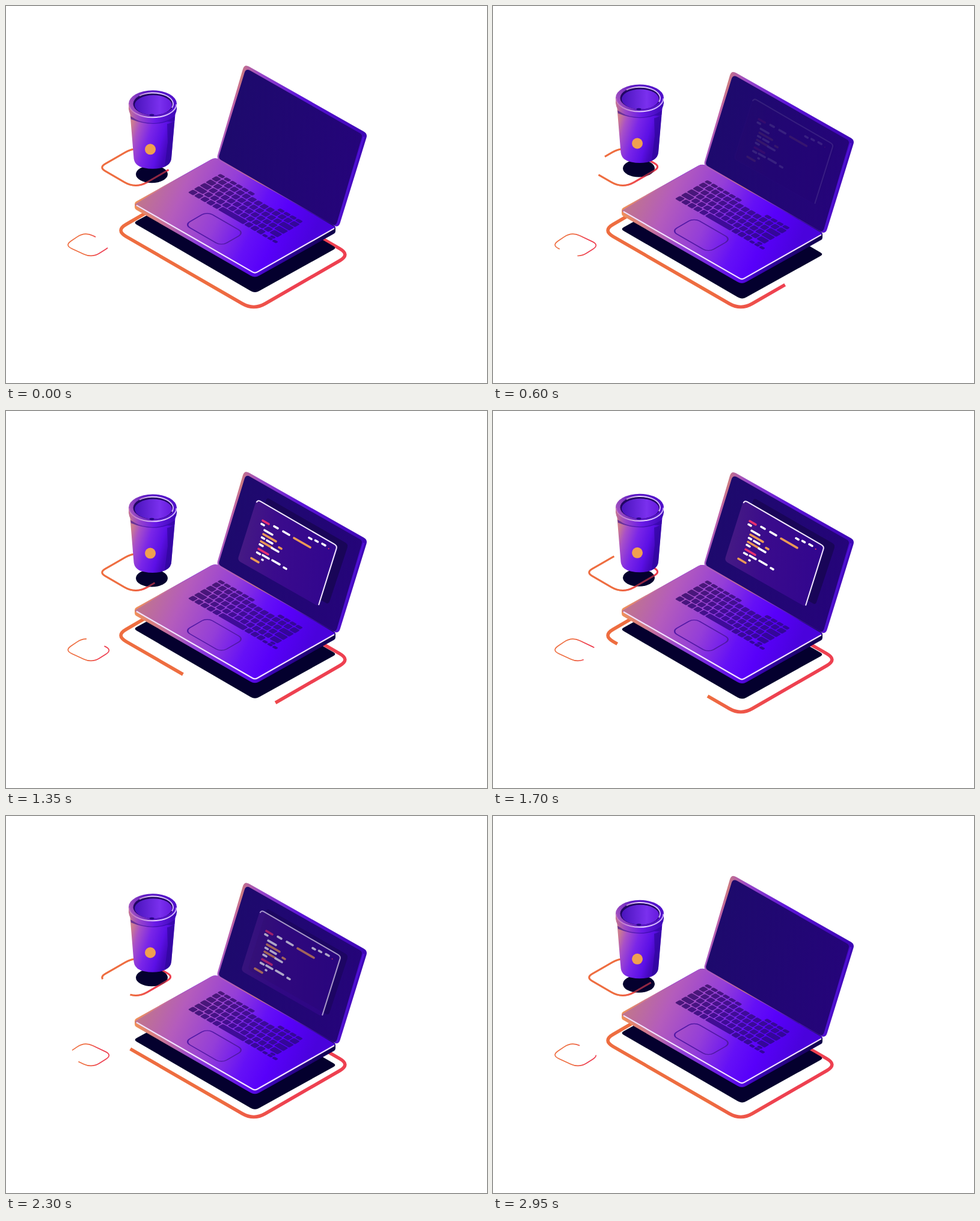
These frames come from a looping animation (800x627 px, 3050 ms). An HTML page:

```html
<!DOCTYPE html>
<html lang="en">
<head>
<meta charset="utf-8">
<title>Floating laptop and cup</title>
<style>
  html, body { margin: 0; width: 100%; height: 100%; overflow: hidden; background: #fff; }
  svg { display: block; width: 800px; height: 627px; }
</style>
</head>
<body>
<svg viewBox="0 0 800 627">
  <defs>
    <linearGradient id="ring">
      <stop offset=".45" stop-color="#ee6d40"/><stop offset=".75" stop-color="#ee4050"/>
    </linearGradient>
    <linearGradient id="lid" gradientUnits="userSpaceOnUse" x1="350" y1="250" x2="600" y2="213">
      <stop offset="0" stop-color="#a656c4"/><stop offset=".17" stop-color="#c065a4"/>
      <stop offset=".24" stop-color="#cc7a80"/><stop offset=".36" stop-color="#9a48c8"/>
      <stop offset=".6" stop-color="#5c14d8"/><stop offset="1" stop-color="#3c05b4"/>
    </linearGradient>
    <linearGradient id="screen" gradientUnits="userSpaceOnUse" x1="360" y1="180" x2="590" y2="260">
      <stop offset="0" stop-color="#1d0a6c"/><stop offset="1" stop-color="#25047a"/>
    </linearGradient>
    <linearGradient id="deck" gradientUnits="userSpaceOnUse" x1="240" y1="290" x2="500" y2="405">
      <stop offset="0" stop-color="#c0748f"/><stop offset=".2" stop-color="#b45cbc"/>
      <stop offset=".45" stop-color="#943ed8"/><stop offset=".66" stop-color="#6510f6"/>
      <stop offset=".8" stop-color="#5800fa"/><stop offset="1" stop-color="#4a02dc"/>
    </linearGradient>
    <linearGradient id="side" gradientUnits="userSpaceOnUse" x1="215" y1="0" x2="547" y2="0">
      <stop offset="0" stop-color="#f09058"/><stop offset=".12" stop-color="#d07a90"/>
      <stop offset=".3" stop-color="#9040d8"/><stop offset=".58" stop-color="#5a08e8"/>
      <stop offset=".68" stop-color="#3a04b4"/><stop offset="1" stop-color="#0e0048"/>
    </linearGradient>
    <linearGradient id="keys" gradientUnits="userSpaceOnUse" x1="0" y1="0" x2="160" y2="0">
      <stop offset="0" stop-color="#4a1878"/><stop offset=".5" stop-color="#3f0c98"/>
      <stop offset="1" stop-color="#32069a"/>
    </linearGradient>
    <linearGradient id="panel" gradientUnits="userSpaceOnUse" x1="388" y1="230" x2="540" y2="250">
      <stop offset="0" stop-color="#451a84"/><stop offset=".4" stop-color="#3a0b8c"/>
      <stop offset="1" stop-color="#32068e"/>
    </linearGradient>
    <linearGradient id="body" gradientUnits="userSpaceOnUse" x1="207" y1="205" x2="281" y2="228">
      <stop offset="0" stop-color="#cc7c90"/><stop offset=".16" stop-color="#a850c8"/>
      <stop offset=".42" stop-color="#7a26e8"/><stop offset=".7" stop-color="#5c10e6"/>
      <stop offset=".86" stop-color="#4608c0"/><stop offset="1" stop-color="#3c06b0"/>
    </linearGradient>
    <linearGradient id="rim" gradientUnits="userSpaceOnUse" x1="204" y1="0" x2="284" y2="0">
      <stop offset="0" stop-color="#c4748f"/><stop offset=".2" stop-color="#9a48c8"/>
      <stop offset=".55" stop-color="#6a1ae8"/><stop offset="1" stop-color="#3c08b4"/>
    </linearGradient>
    <linearGradient id="top" gradientUnits="userSpaceOnUse" x1="208" y1="172" x2="284" y2="150">
      <stop offset="0" stop-color="#a050c0"/><stop offset=".4" stop-color="#5c18c4"/>
      <stop offset="1" stop-color="#5010cc"/>
    </linearGradient>
    <linearGradient id="well" gradientUnits="userSpaceOnUse" x1="214" y1="0" x2="278" y2="0">
      <stop offset="0" stop-color="#4a14bc"/><stop offset=".65" stop-color="#7a30ee"/>
      <stop offset="1" stop-color="#6418dc"/>
    </linearGradient>
    <linearGradient id="shine" gradientUnits="userSpaceOnUse" x1="205" y1="160" x2="284" y2="152">
      <stop offset="0" stop-color="#d890d0" stop-opacity=".5"/><stop offset=".5" stop-color="#e8d4ff"/>
      <stop offset="1" stop-color="#c9a8ff"/>
    </linearGradient>
  </defs>

  <g id="rings" fill="none" stroke="url(#ring)"></g>

  <g class="cup"><ellipse cx="242.5" cy="279.5" rx="26.5" ry="14.5" fill="#04002e"/></g>
  <g id="overlay" fill="none" stroke="url(#ring)" opacity=".6"></g>
  <g class="cup">
    <path d="M206 174 L212.500 253 Q214 266 230 269 Q244 272 258 269 Q274 265 275 253 L282 174Z" fill="url(#body)"/>
    <path d="M207 183 Q244 205 281 183 L280.500 190 Q274 195 268 196 L269 226 L264 266 Q274 263 275 253 L280 192 L268 192 Q240 201 208 188Z" fill="#2c0698" opacity=".6"/>
    <path d="M204 162 V171 Q206 193 244 194.500 Q282 193 284 171 V162Z" fill="url(#rim)"/>
    <ellipse cx="244" cy="162" rx="40" ry="22" fill="url(#top)"/>
    <path d="M204.500 163 A39.500 22 0 0 0 283.500 163" fill="none" stroke="url(#shine)" stroke-width="2"/>
    <ellipse cx="245" cy="162.500" rx="33.500" ry="18.500" fill="#210664"/>
    <ellipse cx="245" cy="164.500" rx="31" ry="16.500" fill="url(#well)"/>
    <path d="M222 149 A33.500 18.500 0 0 1 276 169" fill="none" stroke="url(#shine)" stroke-width="2"/>
    <ellipse cx="242.500" cy="181" rx="4" ry="1.800" fill="#2a0888"/>
    <circle cx="240" cy="238" r="9" fill="#f0a050"/>
  </g>

  <g id="laptop">
    <path id="shade" fill="#04002e"/>
    <path id="under" fill="url(#side)"/>
    <path id="face" fill="url(#deck)"/>
    <path d="M217 331 L410 442 Q414 444.500 418 442 L546 369.500" fill="none" stroke="#f3e4ff" stroke-width="2.200"/>
    <g id="board" fill="url(#keys)" transform="matrix(.875 .505 -.875 .505 356.500 278.500)">
      <rect x="50" y="75" width="70" height="43" rx="10" fill="none" stroke="#5219a6" stroke-width="1.900"/>
    </g>
    <path id="frame" fill="url(#lid)"/>
    <path d="M595 217 L551 362" stroke="#5012d4" stroke-width="3" fill="none"/>
    <path id="glass" fill="url(#screen)"/>
    <path id="drop" fill="#190558"/>
    <g id="window">
      <path id="pane" fill="url(#panel)"/>
      <path d="M416.500 150 Q418.500 145.500 423 148 L545.500 219 Q551 222 549.500 226.500 L520 320.500" fill="none" stroke="#f4eaff" stroke-width="2"/>
    </g>
  </g>
</svg>
<script>
const NS = 'http://www.w3.org/2000/svg';
const $ = id => document.getElementById(id);
const add = (parent, tag, attrs) => {
  const el = document.createElementNS(NS, tag);
  for (const k in attrs) el.setAttribute(k, attrs[k]);
  return parent.appendChild(el);
};

// Closed polygon with rounded corners; cuts alternate between corners.
// The path starts just after the first corner.
function rounded(pts, cuts) {
  const toward = (a, b, d) => {
    const k = d / Math.hypot(b[0] - a[0], b[1] - a[1]);
    return [a[0] + (b[0] - a[0]) * k, a[1] + (b[1] - a[1]) * k];
  };
  const n = pts.length;
  let d = 'M' + toward(pts[0], pts[1], cuts[0]);
  for (let i = 1; i <= n; i++) {
    const p = pts[i % n], c = cuts[i % cuts.length];
    d += 'L' + toward(p, pts[i - 1], c) + 'Q' + p + ' ' + toward(p, pts[(i + 1) % n], c);
  }
  return d + 'Z';
}

// Corners run left, bottom, right, top; gap is its middle at time 0, in percent.
const rings = [
  { pts: [[182.4, 373.3], [412.1, 506], [572.5, 413.5], [341.2, 281.1]], cuts: [20, 22], width: 5.6, gap: 67.6, turns: -1 },
  { pts: [[154.7, 268.6], [215.9, 304], [278.8, 267.6], [217.6, 232.2]], cuts: [12, 22], width: 2.9, gap: 54.6, turns: 2 },
  { pts: [[97.5, 398], [143, 419], [177, 397.5], [131, 375.5]], cuts: [13, 15], width: 1.7, gap: 51, turns: -2 }
];
const drawRing = (parent, r) => add(parent, 'path', {
  d: rounded(r.pts, r.cuts), 'stroke-width': r.width, pathLength: 100, 'stroke-dasharray': '80 20'
});
rings.forEach(r => r.els = [drawRing($('rings'), r)]);
rings[1].els.push(drawRing($('overlay'), rings[1]));

const shape = (id, pts, cuts) => $(id).setAttribute('d', rounded(pts, cuts));
shape('face', [[213, 330], [414, 446], [549, 368], [348, 251]], [4, 8]);
shape('under', [[214, 326], [214, 337], [414, 452], [548, 377], [548, 366], [348, 251]], [3, 3, 8]);
shape('shade', [[212, 360], [414, 477.5], [550, 402], [348, 285]], [6, 8]);
shape('frame', [[350, 254], [396.5, 96], [601.5, 212], [553, 369]], [7, 9]);
shape('glass', [[353, 253], [399, 103], [593, 213.5], [548.5, 366.5]], [5, 8]);
const pane = [[385, 246], [417, 144.5], [552.5, 222.5], [519.5, 322.5]];
shape('pane', pane, [6, 5]);
shape('drop', pane.map(([x, y]) => [x + 17, y - 3]), [6, 5]);

// Keyboard, laid out flat and tilted by the board's matrix
const pitch = 11.35;
const key = (x, y, width = 9.8, height = 9.6) => add($('board'), 'rect', { x, y, width, height, rx: 2 });
for (let c = 0; c < 14; c++) if (c < 6 || c > 9) key(c * pitch, 0, 9.8, 6);
for (let r = 0; r < 4; r++) {
  const y = 7.6 + r * 11.1, head = 9.8 + r * 2.4;
  key(0, y, head);
  let x = head + 1.6;
  for (; x + 9.8 < 148; x += pitch) key(x, y);
  key(x, y, 159 - x);
}
for (let c = 0; c < 5; c++) key(c * pitch, 52);
key(5 * pitch, 52, 48);
for (let c = 0; c < 3; c++) key(106.4 + c * pitch, 52);
key(150, 52, 8, 4.5);
for (let c = 0; c < 3; c++) key(140.5 + c * 9.5, 57, 8, 5);

// Code strokes: x, y, run, colour
const ink = { w: '#fff', o: '#eb9a55', r: '#e83070' };
const code = [
  [427, 180, 10, 'r'], [446, 189.5, 6, 'w'], [461, 198, 10, 'w'], [479, 209, 27, 'o'],
  [504, 208.5, 4, 'w'], [514.5, 213, 4, 'w'], [526, 218.5, 5, 'w'], [536.5, 226.5, .2, 'r'],
  [425, 185.5, 4, 'w'], [430, 196, 13, 'w'], [428, 202.5, 21, 'o'], [425.5, 208, 4, 'w'],
  [434, 213, 9, 'w'], [454, 224.5, 4, 'o'], [424, 214.5, 18, 'o'], [422, 219.5, 5, 'w'],
  [420, 227, 16, 'r'], [442, 225.5, 11, 'w'], [417.5, 233, 5, 'w'], [427, 237.5, 10, 'w'],
  [408, 242.5, 12, 'o'], [426, 245, 1, 'w'], [443, 246, 12, 'w'], [462, 258, 4, 'w']
];
for (const [x, y, run, c] of code) add($('window'), 'path', {
  d: `M${x} ${y}l${run} ${run * .577}`, stroke: ink[c],
  'stroke-width': run < 1 ? 2 : 3.6, 'stroke-linecap': 'round'
});

const clamp = v => Math.max(0, Math.min(1, v));
const smooth = v => v * v * (3 - 2 * v);
const move = (el, x, y) => el.setAttribute('transform', `translate(${x} ${y})`);
const cups = document.querySelectorAll('.cup');

function draw(t) {
  const p = t / 1500 % 1;
  const bob = ((1 - Math.cos(p * 2 * Math.PI)) / 2 + 1 - Math.abs(2 * p - 1)) / 2;
  move($('laptop'), 0, 12.3 * bob + .4);
  cups.forEach(el => move(el, 0, .3 - 11.5 * bob));

  for (const r of rings) {
    const start = r.gap + 10 + r.turns * t / 30;
    r.els.forEach(el => el.setAttribute('stroke-dashoffset', -start));
  }

  const show = smooth(clamp((t - 550) / 250)) * (1 - smooth(clamp((t - 2200) / 250)));
  $('window').setAttribute('opacity', show);
  $('drop').setAttribute('opacity', show);
  move($('window'), 17 * (1 - show), -3 * (1 - show));
}

function tick(now) {
  draw(Math.min(Math.floor(now % 3050 / 50) * 50, 2950));
  requestAnimationFrame(tick);
}
draw(0);
requestAnimationFrame(tick);
</script>
</body>
</html>
```
